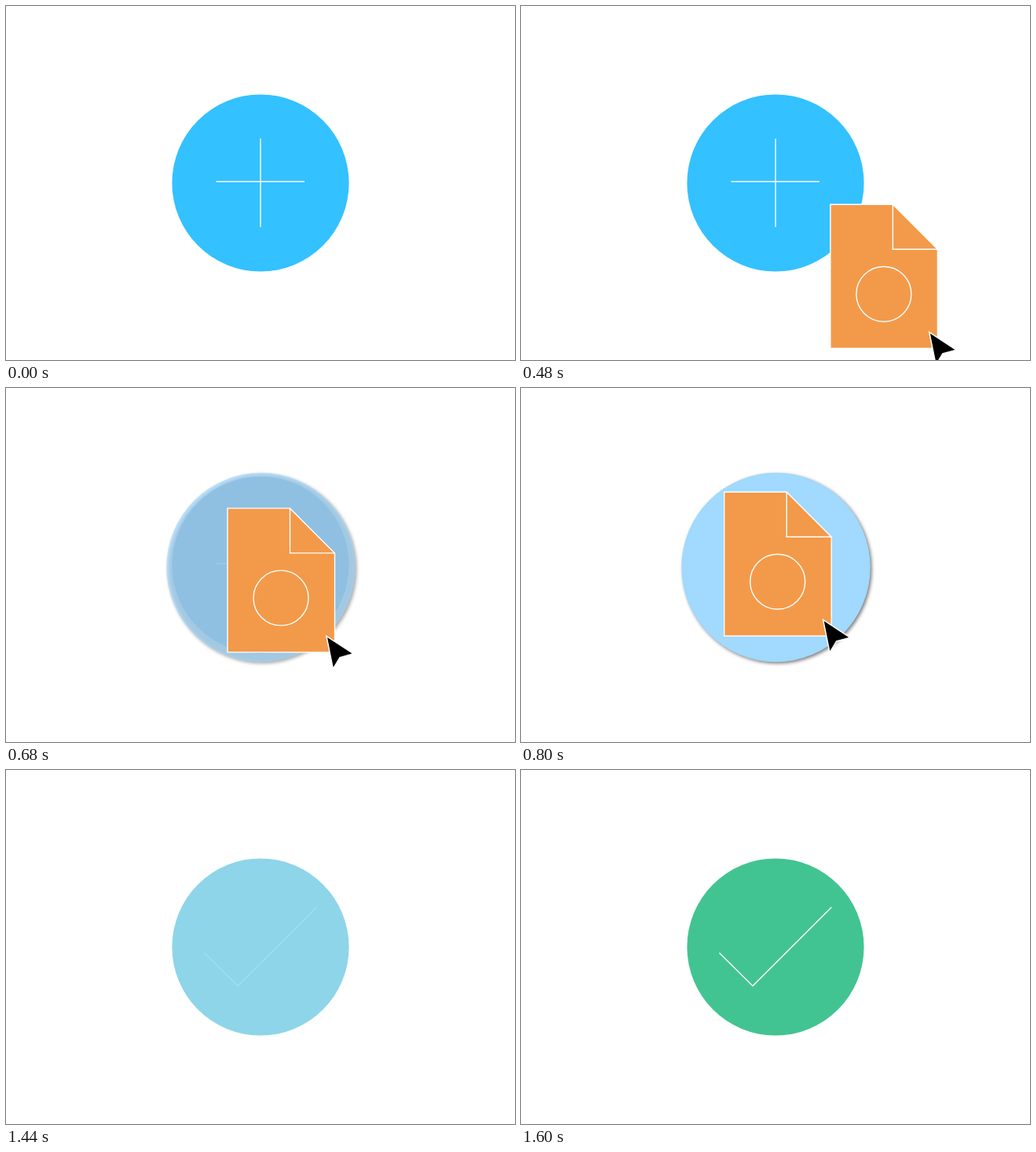
Animation, 648 px wide and 450 px high, one loop 2000 ms. Source, as an HTML page with a canvas:

```html
<!DOCTYPE html>
<html lang="en">
<head>
<meta charset="utf-8">
<title>Drop a file</title>
<style>
  html, body { margin: 0; width: 100%; height: 100%; overflow: hidden; background: #fff; }
  canvas { display: block; width: 648px; height: 450px; }
</style>
</head>
<body>
<canvas id="stage" width="648" height="450"></canvas>
<script>
const ctx = document.getElementById('stage').getContext('2d');
const LOOP = 2000, STEP = 40;
const BLUE = [51, 193, 255], PALE = [161, 217, 255], GREEN = [66, 196, 146];
const ORANGE = '#f39a4a';

const progress = (t, from, to) => Math.min(1, Math.max(0, (t - from) / (to - from)));
const smooth = p => p * p * (3 - 2 * p);
const mix = (a, b, p) => `rgb(${a.map((v, i) => Math.round(v + (b[i] - v) * p)).join(',')})`;

function trace(points, closed) {
  ctx.beginPath();
  points.forEach(([x, y]) => ctx.lineTo(x, y));
  if (closed) ctx.closePath();
}

function line(points) {
  trace(points, false);
  ctx.stroke();
}

function disc(x, y, r, color) {
  ctx.beginPath();
  ctx.arc(x, y, r, 0, Math.PI * 2);
  ctx.fillStyle = color;
  ctx.fill();
}

function drawPlus() {
  line([[267.5, 223.2], [380, 223.2]]);
  line([[324, 168.5], [324, 281]]);
}

function drawCheck(alpha) {
  ctx.globalAlpha = alpha;
  line([[252.5, 232.5], [295, 274.5], [395.3, 174.5]]);
  ctx.globalAlpha = 1;
}

// Enlarged pale disc with a shadow, shown while the file hovers
function drawLifted(alpha) {
  ctx.save();
  ctx.globalAlpha = alpha;
  ctx.shadowColor = 'rgba(0,0,0,0.5)';
  ctx.shadowBlur = 4;
  ctx.shadowOffsetX = 2;
  ctx.shadowOffsetY = 2;
  disc(324.5, 228, 120.2, mix(PALE, PALE, 0));
  ctx.restore();
}

function drawFile() {
  trace([[0, 0], [79.5, 0], [136.5, 57], [136.5, 183], [0, 183]], true);
  ctx.fillStyle = ORANGE;
  ctx.fill();
  ctx.stroke();
  line([[79.5, 0], [79.5, 57], [136.5, 57]]);
  ctx.beginPath();
  ctx.arc(68, 114, 35, 0, Math.PI * 2);
  ctx.stroke();
}

function drawCursor() {
  trace([[127, 164], [158.5, 184.7], [142.5, 189], [134.7, 202]], true);
  ctx.lineWidth = 3;
  ctx.stroke();
  ctx.fillStyle = '#000';
  ctx.fill();
}

function drawDrag(t) {
  const away = 1 - smooth(progress(t, 0, 800));
  const scale = 1 - progress(t, 1200, 1320);
  if (scale <= 0) return;
  ctx.save();
  ctx.translate(340, 235.5);
  ctx.scale(scale, scale);
  ctx.translate(-81.3 + 384 * away, -103.3 + 341 * away);
  drawFile();
  drawCursor();
  ctx.restore();
}

function draw(t) {
  ctx.fillStyle = '#fff';
  ctx.fillRect(0, 0, 648, 450);
  ctx.strokeStyle = '#fff';
  ctx.lineWidth = 1.4;

  const done = progress(t, 1400, 1600);
  const color = t < 1000
    ? mix(BLUE, PALE, progress(t, 560, 640))
    : mix(PALE, GREEN, done);
  disc(324, 225, 112.6, color);
  if (t < 1000) drawPlus();
  if (done > 0) drawCheck(done);

  const lift = progress(t, 600, 720) - progress(t, 1280, 1400);
  if (lift > 0) drawLifted(lift);
  drawDrag(t);
}

const start = performance.now();
function tick() {
  const t = (performance.now() - start) % LOOP;
  draw(Math.floor(t / STEP + 0.01) * STEP);
  requestAnimationFrame(tick);
}
tick();
</script>
</body>
</html>
```
